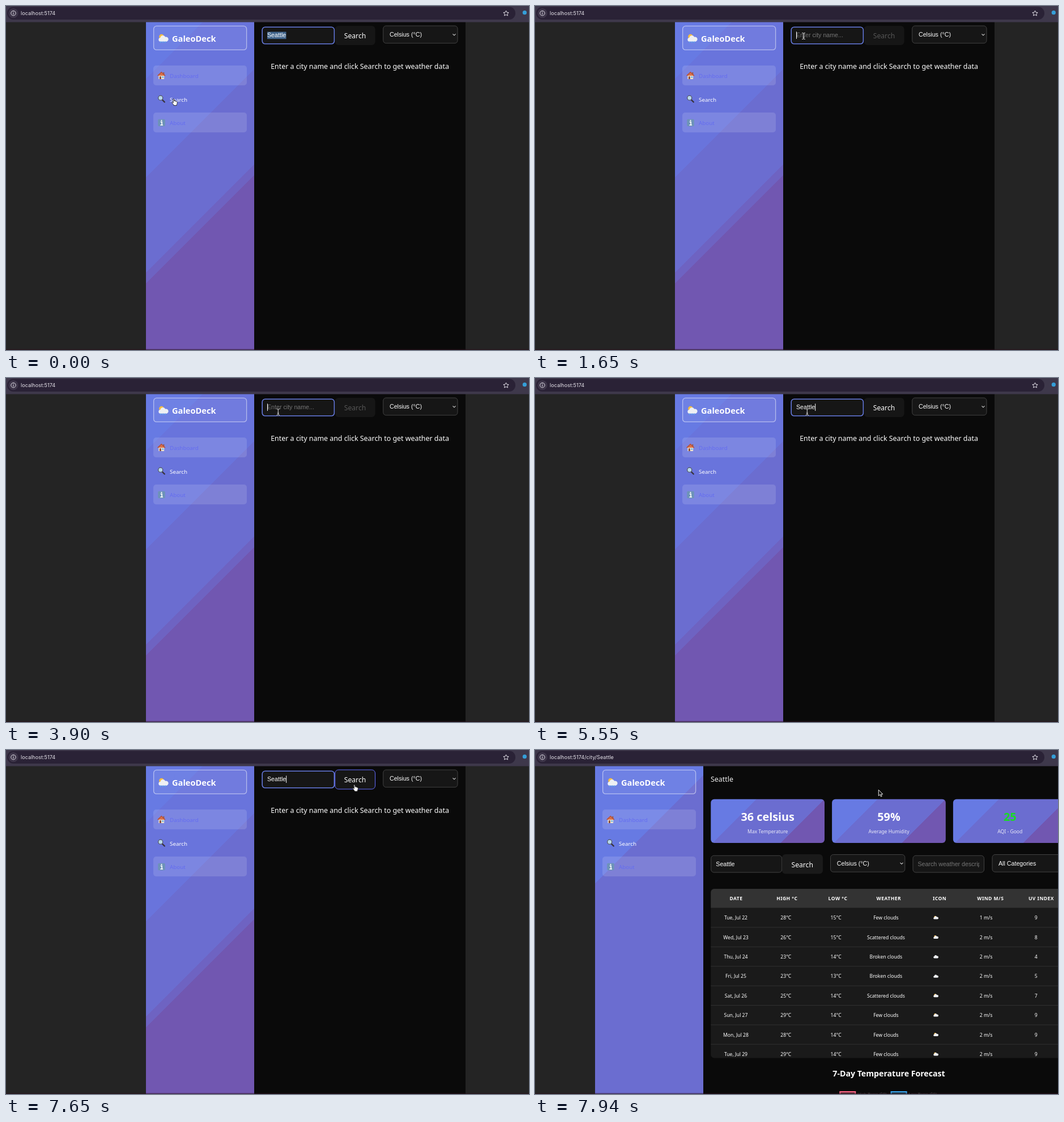
An HTML page for the animation above (8000 ms loop, 923 by 607 pixels).

```html
<!DOCTYPE html>
<html lang="en">
<head>
<meta charset="utf-8">
<title>Weather dashboard</title>
<style>
  html, body { margin: 0; width: 100%; height: 100%; overflow: hidden; background: #242424; }
  svg { display: block; width: 923px; height: 607px; }
  text { font-family: "Noto Sans", "Open Sans", sans-serif; fill: #fff; white-space: pre; }
  .form { font-family: "Liberation Sans", Arial, sans-serif; font-size: 10.67px; }
  .url { font-family: Inter, Roboto, sans-serif; font-size: 9.15px; fill: #e6e3ea; }
  .mid { text-anchor: middle; }
  .bold { font-weight: 600; }
  .link { fill: #646cf0; }
  .hint { fill: #757575; }
  .head { font-weight: 600; letter-spacing: .5px; }
</style>
</head>
<body>
<svg id="stage" viewBox="0 0 923 607" xmlns="http://www.w3.org/2000/svg"></svg>
<script>
const LOOP = 8000;
const LIGHT = '#677ae3', BLUE = '#6974dc', MIX = '#6b6dd0', VIOLET = '#6e63c2', PURPLE = '#7157b1';

const rect = (x, y, w, h, fill, r = 0, more = '') =>
  `<rect x="${x}" y="${y}" width="${w}" height="${h}" rx="${r}" fill="${fill}" ${more}/>`;
const text = (x, y, size, str, cls = '', more = '') =>
  `<text x="${x}" y="${y}" font-size="${size}" class="${cls}" ${more}>${str}</text>`;
const field = (x, y, str, cls = '', more = '') => text(x, y, 10.67, str, 'form ' + cls, more);
const group = (id, body) => `<g id="${id}">${body}</g>`;
const place = (x, y, body, scale = 1) => `<g transform="translate(${x} ${y}) scale(${scale})">${body}</g>`;

// Diagonal colour bands; each band is [end, colour], measured along x + y.
function bands(id, x, y, length, list) {
  let from = 0;
  const stops = list.map(([end, color]) => {
    const pair = [from, end].map(o => `<stop offset="${o}" stop-color="${color}"/>`).join('');
    from = end;
    return pair;
  }).join('');
  return `<linearGradient id="${id}" gradientUnits="userSpaceOnUse" x1="${x}" y1="${y}"
    x2="${x + length / 2}" y2="${y + length / 2}">${stops}</linearGradient>`;
}

const cloudPath = 'M-4.5 4.5a2.9 2.9 0 0 1-.3-5.8A4 4 0 0 1 2.8-2.4 3.5 3.5 0 0 1 5 4.5Z';
const cloud = `<path d="${cloudPath}" fill="#eef0f3"/>`;
const sunCloud = `<circle cx="-2.4" cy="-2.2" r="3.5" fill="#f6b73c"/>` + cloud;
const rain = `<g stroke="#58b4ee" stroke-width="1.2"><path d="M-4 5.5l-1 2.4M0 5.5l-1 2.4M4 5.5l-1 2.4"/></g>`;
const logo = `<circle cx="-3" cy="-3" r="4.3" fill="#f9be3e"/>` + place(0.5, 0.5, cloud, 1.15) + rain;
const house = `<path d="M-4.8-1.5h9.6V6h-9.6Z" fill="#efe3cf"/><path d="M3-6h2v4H3Z" fill="#9a5a45"/>
  <path d="M-6.6 0 0-6.3 6.6 0" fill="#d8734c" stroke="#b74f37" stroke-width="1.5"/>
  <path d="M-3.3 1.2h2.8V6h-2.8Z" fill="#8b4d38"/><path d="M1 1.2h2.8v2.6H1Z" fill="#69b5e5"/>`;
const lens = `<path d="M1.5 1.5 5.5 5.5" stroke="#38323b" stroke-width="2.4" stroke-linecap="round"/>
  <circle cx="-1.6" cy="-1.8" r="4" fill="#b8d9ed" stroke="#555864" stroke-width="1.3"/>`;
const info = rect(-6.3, -6.3, 12.6, 12.6, '#6d93b8', 1.8) +
  `<path d="M-1.8-1.4H.6V4M-2.2 4h4.6" fill="none" stroke="#fff" stroke-width="1.6"/><circle cx="0" cy="-3.9" r="1.1" fill="#fff"/>`;

const sidebar = (x, paint) => rect(x, 28, 191, 579, `url(#${paint})`) + place(x, 0,
  rect(13.6, 35.4, 164, 42, '#fff', 5, 'fill-opacity=".05" stroke="#fff" stroke-opacity=".5" stroke-width="1.3"') +
  place(30.5, 57, logo) + text(46, 62.6, 14.6, 'GaleoDeck', 'bold') +
  rect(13, 105, 165, 35, '#fff', 5, 'fill-opacity=".13"') +
  rect(13, 188, 165, 35, '#fff', 5, 'fill-opacity=".13"') +
  place(27.3, 123, house) + place(27.3, 164, lens) + place(27.5, 206, info) +
  text(42, 126.8, 9.8, 'Dashboard', 'link') + text(42, 168.7, 9.8, 'Search') +
  text(42, 210, 9.8, 'About', 'link'));

const box = (x, y, w, h, stroke = '#424242', width = 1) =>
  rect(x, y, w, h, '#161616', 5, `stroke="${stroke}" stroke-width="${width}"`);
const chevron = (x, y) =>
  `<path d="M${x - 2.5} ${y - 1.2}l2.5 2.5 2.5-2.5" fill="none" stroke="#ddd" stroke-width="1.1"/>`;

const browser = rect(0, 0, 923, 28.5, '#3e384b') + rect(2, 1.5, 897, 22.5, '#2a2236', 11) +
  `<circle cx="13" cy="12.7" r="8.6" fill="#3d3549"/>
   <circle cx="13" cy="12.7" r="4.2" fill="none" stroke="#e3e0e8"/>
   <path d="M13 12.2v2.8M13 10.1v1.1" stroke="#e3e0e8" stroke-width="1.1"/>
   <path d="M882.5 8.2l1.4 3 3.3.4-2.4 2.2.6 3.3-2.9-1.6-2.9 1.6.6-3.3-2.4-2.2 3.3-.4Z" fill="none" stroke="#e3e0e8" stroke-linejoin="round"/>
   <circle cx="915.3" cy="11.7" r="3.6" fill="#359fd8"/>` +
  `<text x="26" y="16.2" class="url">localhost:5174<tspan id="route">/city/Seattle</tspan></text>`;

const searchPage = rect(438, 28, 373, 579, '#0a0a0a') + sidebar(247, 'sideTall') +
  box(452.2, 37.3, 127.2, 29.5, '#667bdf', 1.6) +
  rect(461, 45.5, 33.5, 12.7, '#41658c', 0, 'id="selection"') +
  field(461, 55.2, 'Enter city name...', 'hint', 'id="placeholder"') +
  field(461, 55.2, '', '', 'id="typed"') +
  rect(461, 45.3, 1, 12.7, '#fff', 0, 'id="caret"') +
  rect(580.7, 35, 70.8, 34, '#161616', 6, 'id="button"') +
  text(616, 57, 12.15, 'Search', 'mid', 'id="label"') +
  box(665.7, 35, 131.3, 30.7) + field(677, 54, 'Celsius (°C)') + chevron(791, 50.5) +
  text(624.5, 110.6, 12.4, 'Enter a city name and click Search to get weather data', 'mid');

const loadingPage = rect(468, 28, 121.5, 579, '#0a0a0a') +
  `<circle cx="528.6" cy="295.8" r="14.6" fill="none" stroke="#333" stroke-width="2.8"/>
   <path d="M0-14.6A14.6 14.6 0 0 1 14.6 0" transform="translate(528.6 295.8) rotate(-32)" fill="none" stroke="#667eea" stroke-width="2.8"/>` +
  text(528.7, 339, 10.93, 'Loading weather data...', 'mid', 'style="fill:#d2d2d2"');

const cards = [['36 celsius', 'Max Temperature'], ['59%', 'Average Humidity'], ['25', 'AQI - Good']]
  .map(([value, label], i) => {
    const x = 310.3 + i * 213.8;
    return bands('card' + i, x, 87, 278, [[.29, LIGHT], [.72, MIX], [1, PURPLE]]) +
      rect(x, 86.7, 200.7, 77.3, `url(#card${i})`, 6) +
      text(x + 100.4, 124.6, 19.8, value, 'mid bold', i == 2 ? 'style="fill:#17dd22"' : '') +
      text(x + 100.4, 147.4, 8.6, label, 'mid', 'fill-opacity=".86"');
  }).join('');

const headings = ['DATE', 'HIGH °C', 'LOW °C', 'WEATHER', 'ICON', 'WIND M/S', 'UV INDEX'];
const forecast = `Tue, Jul 22|28|15|Few|1|9
Wed, Jul 23|26|15|Scattered|2|8
Thu, Jul 24|23|14|Broken|2|4
Fri, Jul 25|23|13|Broken|2|5
Sat, Jul 26|25|14|Scattered|2|7
Sun, Jul 27|29|14|Few|2|9
Mon, Jul 28|28|14|Few|2|9
Tue, Jul 29|29|14|Few|2|9`.split('\n').map(line => line.split('|'));

const tableRows = forecast.map(([date, high, low, sky, wind, uv], i) => {
  const y = 296 + i * 34.4;
  const cells = [date, high + '°C', low + '°C', sky + ' clouds', '', wind + ' m/s', uv];
  return cells.map((c, k) => text(354.5 + k * 88.3, y + 3.1, 8.65, c, 'mid')).join('') +
    place(707.6, y, sky == 'Broken' ? cloud : sunCloud, .58) +
    rect(310, y + 16.4, 613, 1, '#303030');
}).join('');

const table = `<clipPath id="tableClip">${rect(310.3, 245, 640, 298.5, '#fff', 6)}</clipPath>
  <g clip-path="url(#tableClip)">` + rect(310, 245, 613, 299, '#1a1a1a') + rect(310, 245, 613, 33.5, '#333') +
  headings.map((h, i) => text(355 + i * 89.75, 265.4, 8.5, h, 'mid head')).join('') + tableRows + '</g>';

const legend = (x, stroke, fill, label) =>
  rect(x, 603, 27, 8, fill, 0, `stroke="${stroke}" stroke-width="2"`) +
  field(x + 31, 610.4, label, '', 'style="font-size:7.6px;fill:#666"');

const cityPage = rect(297, 28, 626, 579, '#0a0a0a') + sidebar(106, 'sideLong') +
  text(310, 56, 12.4, 'Seattle', '', 'font-weight="500" style="fill:#eee"') + cards +
  box(310.7, 186.3, 125, 29.7) + field(319.3, 205, 'Seattle') +
  rect(436, 184, 72, 34.5, '#1a1a1a', 6) + text(471.7, 206.6, 12.15, 'Search', 'mid') +
  box(521.5, 184.5, 131.3, 30.7) + field(532.8, 203.6, 'Celsius (°C)') + chevron(647, 200) +
  box(667, 186.3, 125.5, 29.7) +
  `<clipPath id="inputClip">${rect(675, 186, 109.3, 30, '#fff')}</clipPath>` +
  field(675.5, 205, 'Search weather descriptions...', 'hint', 'clip-path="url(#inputClip)"') +
  box(807, 184.5, 140, 30.7) + field(818, 203.6, 'All Categories') + table +
  text(624.5, 576, 14.15, '7-Day Temperature Forecast', 'mid bold') +
  legend(538.3, '#ff6384', '#6b3440', 'High Temp (°C)') + legend(628.6, '#36a2eb', '#20485f', 'Low Temp (°C)');

const pointers =
  group('arrow', `<path d="M0 0v10.6l2.5-2.3 1.7 3.7 1.7-.8-1.7-3.5h3.4Z" fill="#111" stroke="#fff" stroke-width=".9" stroke-linejoin="round"/>`) +
  group('hand', `<path d="M-1 .6C-1-.5.8-.5.9.6L1.3 4C2-.2 3.1 3.3 3.2 4.3c.8-.7 1.7-.3 1.8.5.8-.4 1.5 0 1.5.9 0 2.6-.4 3.3-1.1 4.5v1.3H.3v-1C-.8 9.2-1.8 8-2.6 6.8c-.7-1 .6-1.8 1.5-.8l.7.8Z" fill="#fff" stroke="#111" stroke-width=".8" stroke-linejoin="round"/>`) +
  group('beam', ['#222" stroke-width="2', '#ddd" stroke-width="1'].map(s =>
    `<path d="M-2.8-5.6Q0-5.6 0-4.2Q0-5.6 2.8-5.6M0-4.5V4.5M-2.8 5.6Q0 5.6 0 4.2Q0 5.6 2.8 5.6M-1.6 2.2H1.6" fill="none" stroke="${s}"/>`).join(''));

document.getElementById('stage').innerHTML =
  '<defs>' +
  bands('sideTall', 247, 28, 770, [[.13, LIGHT], [.357, BLUE], [.575, MIX], [.6, VIOLET], [1, PURPLE]]) +
  bands('sideLong', 106, 28, 770, [[.269, LIGHT], [1, MIX]]) + '</defs>' +
  rect(0, 0, 923, 607, '#242424') +
  group('search', searchPage) + group('loading', loadingPage) + group('city', cityPage) +
  rect(0, 605.5, 923, 1.5, '#2a101c', 0, 'fill-opacity=".6"') + browser + group('pointer', pointers);

const pages = [[0, 'search'], [7790, 'loading'], [7940, 'city']];
const typing = [[0, 'Seattle'], [1650, ''], [4500, 'S'], [4800, 'Se'], [4950, 'Sea'],
  [5250, 'Seat'], [5400, 'Seatt'], [5550, 'Seattle']];
const blink = [[0, 0], [1650, 1], [2100, 0], [2700, 1], [3300, 0], [3900, 1], [4350, 0],
  [4500, 1], [6150, 0], [6600, 1], [7050, 0], [7500, 1]];
const moves = [
  [0, 'hand', 295.7, 164], [600, 'hand', 279, 161], [750, 'hand', 318, 143], [900, 'arrow', 425, 80],
  [1050, 'beam', 474, 53],
  [1950, 'beam', 480, 58], [2100, 'arrow', 440, 84], [2250, 'hand', 370, 125], [2400, 'hand', 320, 155],
  [2550, 'hand', 301, 163], [2700, 'hand', 302, 162],
  [3000, 'hand', 312, 157], [3150, 'hand', 350, 130], [3300, 'arrow', 430, 84], [3450, 'beam', 482, 56],
  [3600, 'beam', 480.3, 60],
  [6150, 'beam', 484, 60], [6300, 'beam', 505, 62], [6450, 'beam', 555, 65], [6600, 'hand', 606, 67],
  [6750, 'arrow', 655, 70], [6900, 'arrow', 680, 71], [7050, 'arrow', 685, 69], [7200, 'arrow', 668, 67],
  [7350, 'hand', 638, 64], [7500, 'hand', 621, 62], [7650, 'hand', 614.8, 61.5],
  [7790, 'arrow', 615.5, 60.3], [7940, 'arrow', 606.3, 70.3]
];

const el = Object.fromEntries([...document.querySelectorAll('[id]')].map(node => [node.id, node]));
const at = (table, time) => table.findLast(row => row[0] <= time);
const show = (id, on) => el[id].setAttribute('display', on ? 'inline' : 'none');

function draw(time) {
  const [, page] = at(pages, time);
  const [, word] = at(typing, time);
  const [, kind, x, y] = at(moves, time);
  ['search', 'loading', 'city'].forEach(id => show(id, id == page));
  ['arrow', 'hand', 'beam'].forEach(id => show(id, id == kind));
  el.pointer.setAttribute('transform', `translate(${x} ${y})`);
  show('route', page == 'city');
  show('selection', time < 1650);
  show('placeholder', !word);
  show('caret', at(blink, time)[1]);
  if (el.typed.textContent != word) el.typed.textContent = word;
  if (page == 'search') el.caret.setAttribute('x', 461 + (word ? el.typed.getComputedTextLength() : 0));
  el.label.style.fill = word ? '#fff' : '#565656';
  const hover = kind == 'hand' && x > 580;
  el.button.setAttribute('stroke', hover ? '#646cff' : 'none');
}

const start = performance.now();
function tick() {
  draw((performance.now() - start) % LOOP);
  requestAnimationFrame(tick);
}
tick();
</script>
</body>
</html>
```
